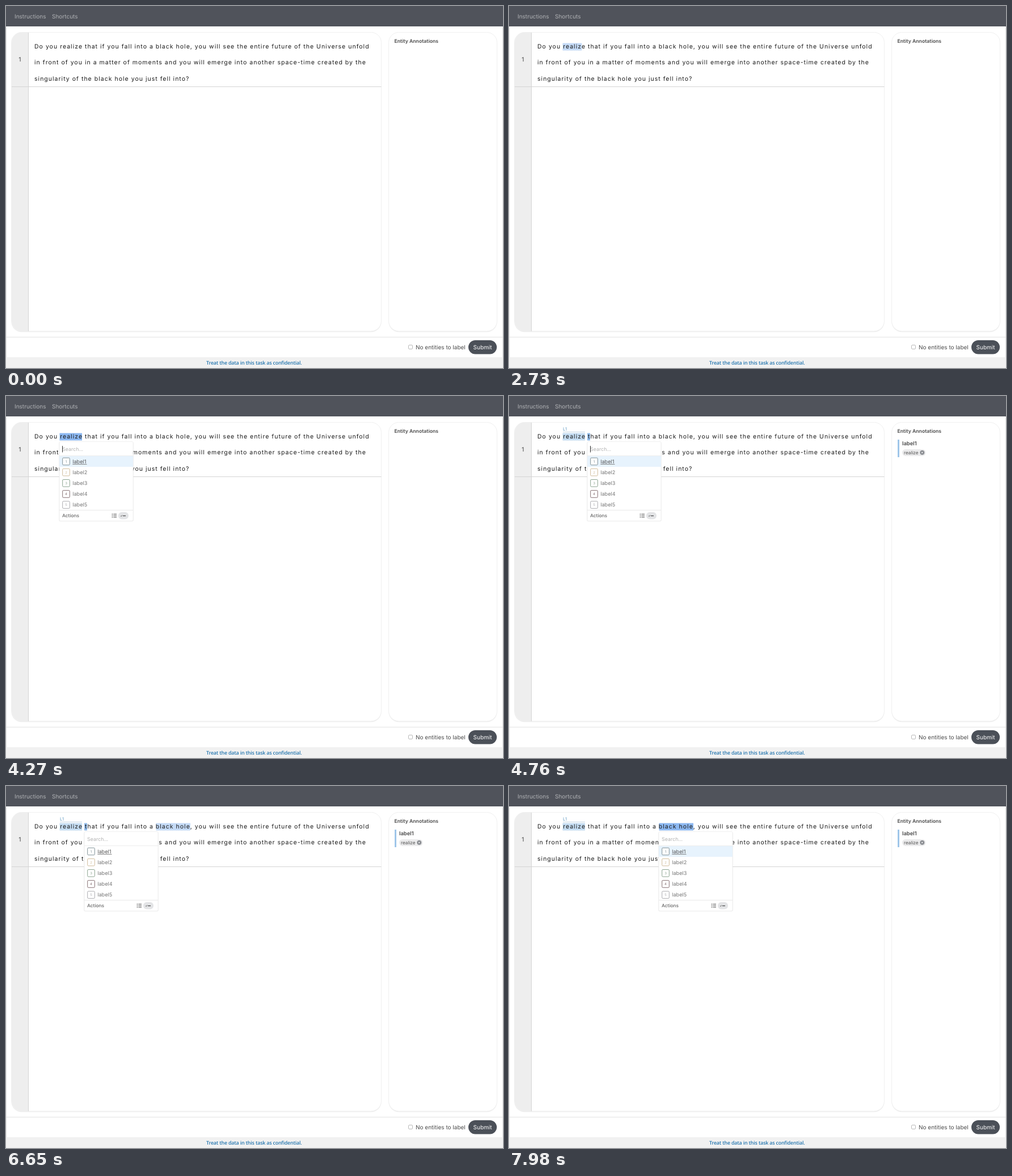
An HTML page that plays this animation: 876x639 px, repeating every 8 s.

```html
<!DOCTYPE html>
<html lang="en">
<head>
<meta charset="utf-8">
<title>Entity annotation</title>
<style>
  html, body { margin: 0; width: 100%; height: 100%; overflow: hidden; background: #fff; }
  svg { display: block; width: 100vw; height: 100vh; }
  text { font-family: Inter, Roboto, sans-serif; text-rendering: geometricPrecision; white-space: pre; }
  .body { font-size: 10.5px; letter-spacing: 1.022px; fill: #1c1c1c; }
  .notice { font: 600 8.8px "Open Sans", "Noto Sans", sans-serif; letter-spacing: -.15px; fill: #2375ae; }
</style>
</head>
<body>
<svg id="stage" viewBox="0 0 876 639" xmlns="http://www.w3.org/2000/svg"></svg>
<script>
const LOOP = 8000, STEP = 70;
const stage = document.getElementById('stage');

function add(parent, tag, attrs, label) {
  const el = document.createElementNS('http://www.w3.org/2000/svg', tag);
  for (const k in attrs) el.setAttribute(k, attrs[k]);
  if (label !== undefined) el.textContent = label;
  parent.appendChild(el);
  return el;
}
const rect = (p, x, y, width, height, fill, more) =>
  add(p, 'rect', { x, y, width, height, fill, ...more });
const path = (p, d, stroke, w = 1) =>
  add(p, 'path', { d, stroke, 'stroke-width': w, fill: 'none' });
const write = (p, x, y, size, fill, label, more) =>
  add(p, 'text', { x, y, 'font-size': size, fill, ...more }, label);
const group = p => add(p, 'g', {});
const show = (el, on) => el.setAttribute('visibility', on ? 'inherit' : 'hidden');

// Page frame
rect(stage, 0, 0, 876, 639, '#fff');
path(stage, 'M.5 36V620M875.5 36V620', '#e6e6e6');
rect(stage, 0, 0, 876, 36, '#50535b');
write(stage, 15, 22, 10, '#b0b2b5', 'Instructions');
write(stage, 81, 22, 10, '#b0b2b5', 'Shortcuts');

function panel(x, w) {
  rect(stage, x, 47.5, w, 528, '#ededed', { rx: 18 });
  rect(stage, x, 46.5, w, 527.5, '#fff', { rx: 18, stroke: '#f0f0f0' });
}
panel(9.5, 652);
panel(674.5, 191);
path(stage, 'M39 46.5H28a18 18 0 0 0-18 18V556a18 18 0 0 0 18 18H39Z', 'none').setAttribute('fill', '#eee');
path(stage, 'M39.5 47V574', '#d4d4d4');
path(stage, 'M10 142.5H661.5', '#d4d4d4');
write(stage, 24.5, 98, 10.5, '#444', '1', { 'text-anchor': 'middle' });

path(stage, 'M0 584.5H876', '#e4e4e4');
rect(stage, 709.5, 598.5, 7, 7, '#fff', { rx: 1.5, stroke: '#bbb' });
write(stage, 722, 606, 10, '#4d4d4d', 'No entities to label');
rect(stage, 815, 590, 50, 24.5, '#4b5058', { rx: 12.2 });
write(stage, 840, 606, 10, '#fff', 'Submit', { 'text-anchor': 'middle' });
rect(stage, 0, 620, 876, 19, '#f1f1f1');
add(stage, 'text', { x: 437.3, y: 633, 'text-anchor': 'middle', class: 'notice' },
  'Treat the data in this task as confidential.');

// Highlights sit below the running text
const tag = group(stage);
rect(tag, 94.5, 65.5, 39.5, 13, '#c5ddf2');
path(tag, 'M95 63.5H134', '#c3d6e4');
write(tag, 95, 61, 7.6, '#5b98c0', 'L1');
const mark = rect(stage, 138, 65.5, 5, 13, '#92bbe8');
const picks = [
  { x: 94.5, width: 39.5, chars: 7, from: 2310, to: 2870, open: 3150, close: 4410 },
  { x: 264.5, width: 60.5, chars: 10, from: 6020, to: 6580, open: 7140, close: LOOP }
];
for (const p of picks) p.el = rect(stage, p.x, 65.5, 0, 13, '#8db9f2');

[
  'Do you realize that if you fall into a black hole, you will see the entire future of the Universe unfold',
  'in front of you in a matter of moments and you will emerge into another space-time created by the',
  'singularity of the black hole you just fell into?'
].forEach((s, i) => add(stage, 'text', { x: 50, y: 75 + i * 28.3, class: 'body' }, s));

// Sidebar
write(stage, 684.5, 65.3, 8.7, '#4a4a4a', 'Entity Annotations', { 'font-weight': 600 });
const entry = group(stage);
rect(entry, 685, 77, 3, 31, '#9fc6e9');
write(entry, 693, 87.2, 9.4, '#4a4a4a', 'label1', { 'font-weight': 600 });
rect(entry, 693, 94, 41.5, 12, '#ebebec', { rx: 6 });
write(entry, 696, 103, 8.2, '#555', 'realize');
add(entry, 'circle', { cx: 728.3, cy: 99.8, r: 3.9, fill: '#85888d' });
path(entry, 'M726.8 98.3l3 3m0-3l-3 3', '#fff');

// Label menu, drawn once around x = 0
const menu = group(stage);
rect(menu, -1, 81, 132, 140.5, '#000', { rx: 3, opacity: .06 });
rect(menu, 0, 80.5, 130, 140, '#fff', { rx: 2, stroke: '#f0f0f0' });
write(menu, 5, 97, 8.9, '#b2b2b2', 'Search...');
const caret = path(menu, 'M5.5 88V99.5', '#333');
path(menu, 'M0 105.5H130', '#ededed');
const hover = rect(menu, 0, 106, 130, 19, '#e7f3fd');
['#7f9096', '#d0bc9a', '#8ba38f', '#856f72', '#ababaf'].forEach((c, i) => {
  const y = 115.5 + i * 19.15;
  rect(menu, 5.7, y - 6.3, 12.6, 12.6, '#fff', { rx: 1.5, stroke: c });
  write(menu, 12, y + 2.2, 6, c, i + 1, { 'text-anchor': 'middle' });
  write(menu, 23.3, y + 3.3, 9.1, i ? '#777' : '#555', 'label' + (i + 1));
});
path(menu, 'M23.3 120.5H48.5', '#777', .9);
path(menu, 'M0 201.5H130', '#e9e9e9');
write(menu, 5, 214.3, 8.3, '#666', 'Actions', { 'font-weight': 500 });
path(menu, 'M92.5 208.5h2m1 0h5.5M92.5 211.2h2m1 0h5.5M92.5 214h2m1 0h5.5', '#555', 1.1);
rect(menu, 104, 205, 18, 12.5, '#e3e4e6', { rx: 6 });
path(menu, 'M108 211.5l1.2 1 1.8-2.2', '#555', .9);
path(menu, 'M112 211.5h5', '#444', 1.2);

const menus = [
  { x: 94, open: 3150, close: 4410, hoverOn: 3850, hoverOff: 4410, blur: 4410 },
  { x: 138, open: 4410, close: 6860, hoverOn: 4410, hoverOff: 5530, blur: 6020 },
  { x: 264, open: 7140, close: LOOP, hoverOn: 7980, hoverOff: LOOP, blur: LOOP }
];

function draw(time) {
  const t = Math.floor(time / STEP) * STEP;
  const within = (a, b) => t >= a && t < b;

  for (const p of picks) {
    const k = Math.min(1, Math.max(0, (t - p.from) / (p.to - p.from)));
    p.el.setAttribute('width', p.width * Math.ceil(k * p.chars) / p.chars);
    p.el.setAttribute('fill', t < p.open ? '#c5dbf7' : '#8db9f2');
    show(p.el, within(p.from, p.close));
  }
  show(tag, t >= 4410);
  show(entry, t >= 4410);
  show(mark, within(4410, 6860));

  const m = menus.find(m => within(m.open, m.close));
  show(menu, m);
  if (!m) return;
  menu.setAttribute('transform', `translate(${m.x} 0)`);
  show(hover, within(m.hoverOn, m.hoverOff));
  show(caret, t < m.blur && (t - m.open) % 1000 < 500);
}

function tick(now) {
  draw(now % LOOP);
  requestAnimationFrame(tick);
}
draw(0);
requestAnimationFrame(tick);
</script>
</body>
</html>
```
